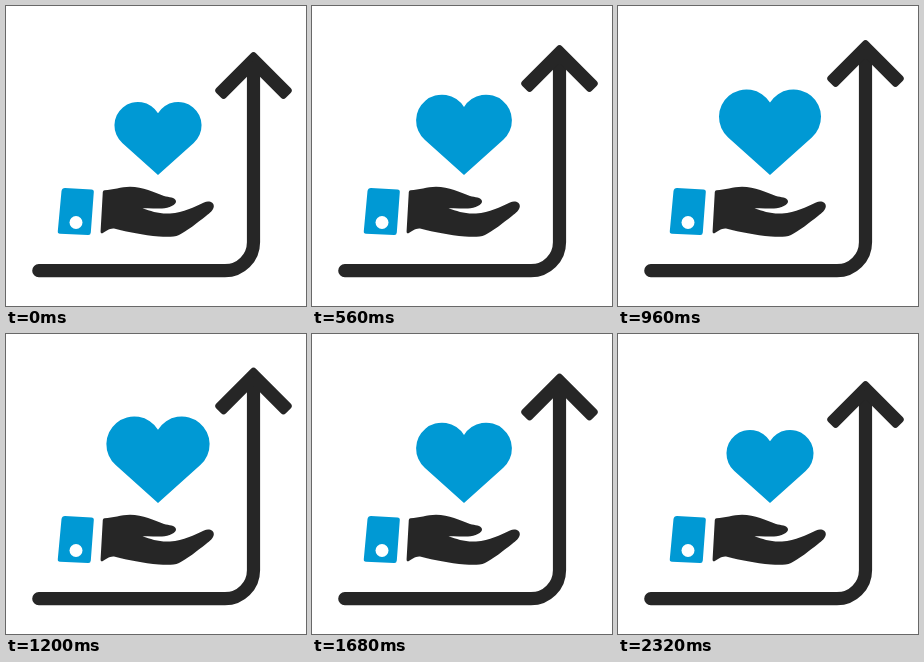
Recreate the animation shown at these times as an HTML page. Size 300x300 px, loop 2400 ms.

```html
<!DOCTYPE html>
<html>
<head>
<meta charset="utf-8">
<style>
  html, body { margin: 0; height: 100%; overflow: hidden; background: #fff; }
  svg { display: block; width: 100%; height: 100%; }
  .ink { fill: #262626; }
  .blue { fill: #0099d4; }
  #shaft { fill: none; stroke: #262626; stroke-width: 13.2; stroke-linecap: round; }
  #head { stroke: #262626; stroke-width: 7; stroke-linejoin: round; }
</style>
</head>
<body>
<svg viewBox="0 0 300 300">
  <path id="shaft"/>
  <path id="head" class="ink" d="M247.5 3.5 L282.2 38.2 L277.4 43 L247.5 13.1 L217.6 43 L212.8 38.2 Z"/>

  <!-- heart with its tip at the origin -->
  <path id="heart" class="blue" d="M0 0 L-35.7 -32 A23.5 23.5 0 1 1 0 -61.8 A23.5 23.5 0 1 1 35.7 -32 Z"/>

  <path class="blue" d="M59 182 L85.500 183.500 Q88 183.700 87.800 186 L84.800 226.500 Q84.600 229.200 82 229 L54 227.800 Q51.500 227.600 51.800 225 L55.500 185 Q56 182 59 182 Z"/>
  <circle cx="70" cy="216.500" r="6.500" fill="#fff"/>
  <path class="ink" d="M98.500 184.200
    C107 184 115 180.800 124 180.800 C137 181 148 186.500 158 190
    C163 191.500 169 190.800 170 195 C170.500 199 163 202 156 202.500
    C149 203 143 201.500 136.500 202.500
    C145 205 153 208.200 164 207.500 C178 206.500 188 201 198 196.500
    C203 194.300 208 196.300 207.800 200.500 C207.500 204 204 207 200 210
    C191 217 181 225 173 229 C168 231.300 160 231 153 230.500
    C137 229.300 122 226 109 222.800 C104 221.600 100 225.500 96.500 227.200
    C95 227.800 94.500 226.500 94.600 225 L96.800 186 Q97 184.300 98.500 184.200 Z"/>
</svg>
<script>
  const LOOP = 2400, STEP = 80;
  const shaft = document.getElementById('shaft');
  const head = document.getElementById('head');
  const heart = document.getElementById('heart');

  // Time away from the peak, measured around the loop
  function away(t, peak) {
    const d = Math.abs(t - peak);
    return Math.min(d, LOOP - d);
  }

  function draw(now) {
    const t = Math.floor(now % LOOP / STEP) * STEP;
    const top = 32.5 + away(t, 1100) / 80;
    const heartTop = Math.min(96, 81.4 + away(t, 1120) * 0.013);

    shaft.setAttribute('d', `M32.8 264.7 H219 A28.500 28.500 0 0 0 247.500 236.200 V${top + 13}`);
    head.setAttribute('transform', `translate(0 ${top})`);
    heart.setAttribute('transform', `translate(152 169) scale(${(169 - heartTop) / 73})`);
  }

  let start;
  function tick(now) {
    start ??= now;
    draw(now - start);
    requestAnimationFrame(tick);
  }
  draw(0);
  requestAnimationFrame(tick);
</script>
</body>
</html>
```
